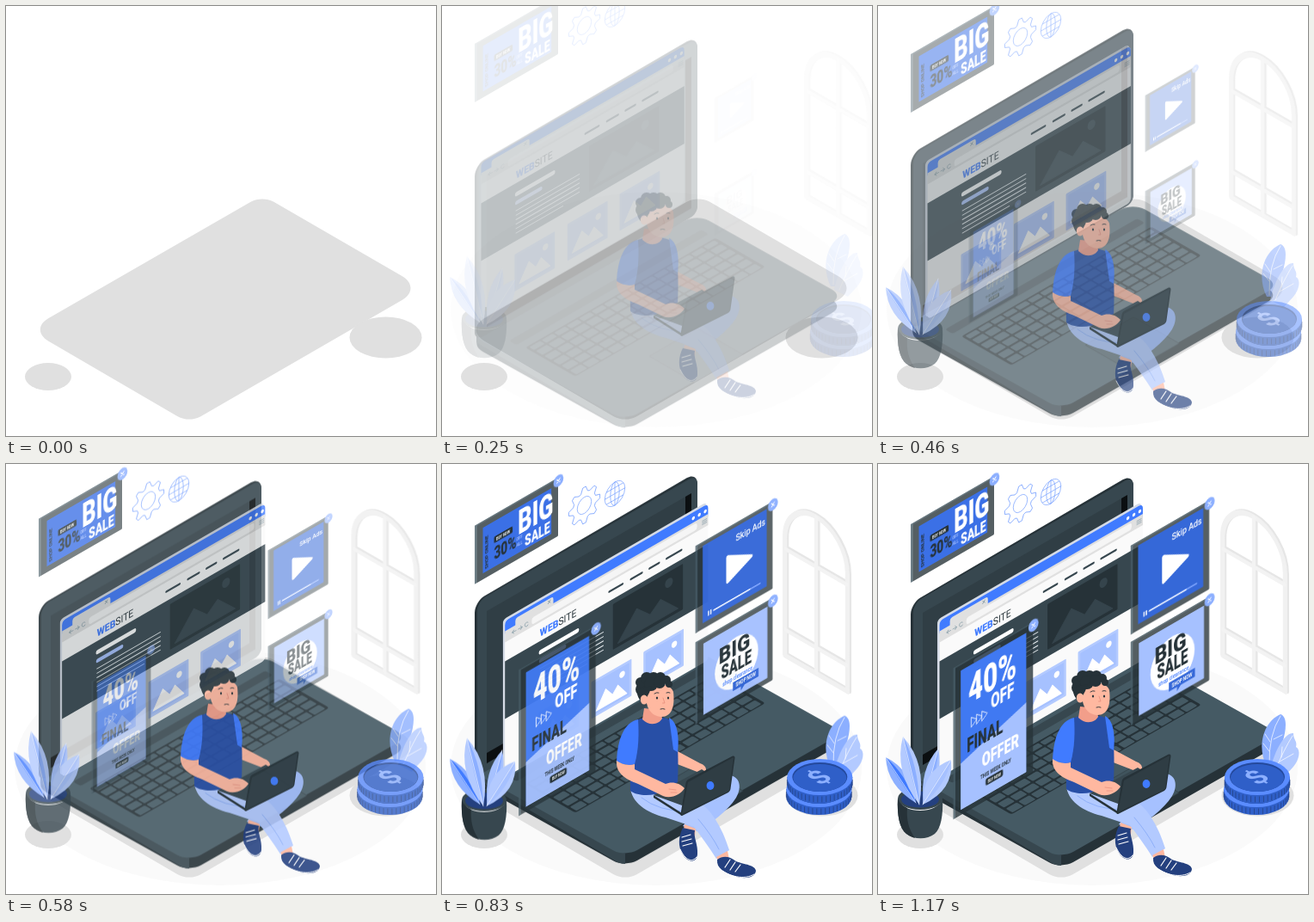
An HTML page that plays this animation: 500x500 px, repeating every 1210 ms.

```html
<!DOCTYPE html>
<html lang="en">
<head>
<meta charset="utf-8">
<title>Online ads</title>
<style>
  html, body { margin: 0; width: 100%; height: 100%; overflow: hidden; background: #fff; }
  svg { display: block; width: 100%; height: 100%; }
  text { font-family: Roboto, "Liberation Sans", sans-serif; }
</style>
</head>
<body>
<svg id="stage" viewBox="0 0 500 500"></svg>
<script>
const BLUE = '#407bff', PALE = '#a6c1ff', LIGHT = '#b3caff', INK = '#263238', SLATE = '#37474f', STEEL = '#455a64',
  NAVY = '#24407f', SKIN = '#ffb8a0', BLUSH = '#e58d7b';

// Markup helpers
const path = (d, fill, more = '') => `<path d="${d}" fill="${fill}" ${more}/>`;
const stroke = (d, color, w = 1, more = '') =>
  `<path d="${d}" fill="none" stroke="${color}" stroke-width="${w}" stroke-linecap="round" stroke-linejoin="round" ${more}/>`;
const rect = (x, y, w, h, fill, r = 0) => `<rect x="${x}" y="${y}" width="${w}" height="${h}" rx="${r}" fill="${fill}"/>`;
const oval = (x, y, rx, ry, fill, more = '') => `<ellipse cx="${x}" cy="${y}" rx="${rx}" ry="${ry}" fill="${fill}" ${more}/>`;
const dot = (x, y, r, fill, more) => oval(x, y, r, r, fill, more);
const text = (x, y, size, fill, str, weight = 700) =>
  `<text x="${x}" y="${y}" font-size="${size}" font-weight="${weight}" fill="${fill}">${str}</text>`;
const narrow = (x, y, size, fill, str, weight = 700) =>
  `<g transform="translate(${x} ${y}) scale(.75 1)">${text(0, 0, size, fill, str, weight)}</g>`;
const plane = (m, x, y, inner) => `<g transform="matrix(${m} ${x} ${y})">${inner}</g>`;
const wall = (x, y, inner) => plane('.866 -.5 0 1', x, y, inner);
const sideWall = (x, y, inner) => plane('.866 .5 0 1', x, y, inner);
const floor = (x, y, inner) => plane('.866 -.5 .866 .5', x, y, inner);
const times = (n, f) => Array.from({ length: n }, (_, i) => f(i)).join('');

// Polygon with rounded corners; each point is [x, y, cut length]
function blob(pts, fill) {
  const n = pts.length, k = .45;
  const d = pts.map(([x, y, c], i) => {
    const toward = ([px, py], len) => {
      const l = Math.hypot(px - x, py - y);
      return [x + (px - x) * len / l, y + (py - y) * len / l];
    };
    const a = pts[(i + n - 1) % n], b = pts[(i + 1) % n];
    return `${i ? 'L' : 'M'}${toward(a, c)}C${toward(a, c * k)} ${toward(b, c * k)} ${toward(b, c)}`;
  }).join('');
  return path(d + 'Z', fill);
}

function shadows() {
  return blob([[26.6, 376.3, 26], [298, 220, 15], [484.7, 328, 28], [213, 485, 15]], '#e0e0e0') +
    oval(49, 431, 27, 16, '#e0e0e0') + oval(441.5, 385.5, 42, 24, '#e0e0e0');
}

function archWindow() {
  const arch = 'M3 -3V-140A42 45 0 0 1 87 -140V-3Z';
  const bars = 'M45 -4V-184M4 -127H86M4 -33H86';
  return sideWall(400, 223, stroke(arch + bars, '#e6e6e6', 6)) +
    sideWall(398, 224, stroke(arch, '#f1f1f1', 6) + stroke(bars, '#f3f3f3', 5));
}

function gearAndGlobe() {
  const p = times(32, i => {
    const a = (i - .5) * Math.PI / 16, r = i % 4 < 2 ? 21 : 15.5;
    return `${i ? 'L' : 'M'}${(r * Math.cos(a)).toFixed(1)} ${(r * Math.sin(a)).toFixed(1)}`;
  });
  const ring = `fill="none" stroke="${BLUE}" stroke-width=".7"`;
  return `<g opacity=".7">` +
    wall(165.5, 46, stroke(p + 'Z', BLUE, .8) + `<circle r="9.5" ${ring}/>`) +
    wall(201, 32.5, `<circle r="13.5" ${ring}/><ellipse rx="6" ry="13.5" ${ring}/>` +
      stroke('M0 -13.5V13.5M-13.5 0H13.5M-11 -7H11M-11 7H11', BLUE, .7)) + '</g>';
}

function laptop() {
  const board = [[30, 357, 20], [297, 219, 15], [467, 314, 15], [213, 459, 16]];
  const low = board.map(([x, y, c]) => [x, y + 12, c]);
  const keys = times(6, r => times(15, c => {
    if (r === 5 && c > 4 && c < 9) return c === 5 ? rect(86, 57, 64, 8.5, STEEL, 1.5) : '';
    return rect(3 + c * 16.7, r ? 11 + (r - 1) * 11.4 : 2, 14.6, r ? 9 : 6.5, STEEL, 1.5);
  }));
  return blob(low, INK) +
    path('M40 356V368L199 462Q206 467 213 467V455Z', SLATE) + blob(board, STEEL) +
    floor(78, 366, rect(0, 0, 258, 10, SLATE, 3)) +
    floor(97, 374, rect(0, 0, 255, 67, INK, 3) + keys) +
    floor(240, 384, rect(0, 0, 66, 62, SLATE, 2) + rect(1, 1, 64, 60, '#40545d', 2)) +
    blob([[38, 162, 13], [297, 11, 14], [297, 218, 10], [38, 366, 10]], INK) +
    blob([[41, 162, 11], [297, 14, 11], [297, 218, 8], [41, 365, 8]], SLATE) +
    path('M52 173L290 36V212L52 350Z', '#303e45') +
    path('M52 350L290 212V36L283 40V205L52 338Z', '#0b0f11');
}

function picture(x, y, w, h, back, front) {
  const at = (u, v) => `${x + u * w} ${y + v * h}`;
  return rect(x, y, w, h, back, 1) + dot(x + w * .8, y + h * .24, h * .1, front) +
    path(`M${at(.07, .92)}L${at(.34, .4)}L${at(.53, .7)}L${at(.68, .5)}L${at(.93, .92)}Z`, front, `stroke="${front}" stroke-linejoin="round"`);
}

function browser() {
  const cards = [45, 116, 186].map(x => rect(x, 129, 54, 43, LIGHT, 1) +
    picture(x + 3, 132, 48, 37, PALE, '#fff')).join('');
  return wall(69, 181, rect(0, 0, 274, 182, '#d5dbe6', 5)) + wall(71.5, 182.5,
    rect(0, 0, 273, 182, '#fafafa', 5) + rect(0, 0, 273, 18, BLUE, 5) +
    rect(0, 12, 273, 13, '#e0e0e0') + rect(14, 4, 51, 11, '#e0e0e0', 3) +
    stroke('M58 6l3 3m0 -3l-3 3', '#78909c', .7) +
    stroke('M10 18.5h5m-5 0l2 -2m-2 2l2 2M23 18.5h-5m5 0l-2 -2m2 2l-2 2M31 17a2.4 2.4 0 1 0 0 3M265 16.5h6m-6 2h6m-6 2h6', '#90a4ae', .8) +
    rect(36, 14.5, 222, 8, '#f5f5f5', 3) + [253, 261, 269].map(x => dot(x, 7, 2, '#fff')).join('') +
    `<text x="47" y="42" font-size="12"><tspan font-weight="800" fill="${BLUE}">WEB</tspan><tspan fill="${INK}">SITE</tspan></text>` +
    stroke('M140 36h18M169 36h15M194 36h13M217 36h20', SLATE, 2.4) +
    rect(0, 47, 273, 67, SLATE) + picture(145, 53, 94, 53, INK, '#35444c') +
    stroke('M48 60H97', '#fff', 5) + stroke('M48 70H80', PALE, 4.5) +
    times(6, i => stroke(`M47 ${79 + i * 5.2}H${i === 5 ? 110 : 132}`, '#e8edf0', 1.1)) + cards);
}

const closer = (x, y) => dot(x, y, 6.8, '#8cafff') + stroke(`M${x - 2} ${y - 2}l4 4m0 -4l-4 4`, '#fff', 1.1);

// Dark translucent pane with its thin left side and a close button
function pane(x, y, w, h, inner) {
  return wall(x, y, `<g opacity=".78">${rect(0, 0, w, h, INK, 1) + rect(0, 0, 3, h, STEEL) + rect(0, 0, w, 1.5, STEEL)}</g>` +
    inner + closer(w + .5, 4));
}

function adBoard() {
  return pane(38, 70, 112, 68, rect(11, 8, 92, 53, '#3b70e6') +
    `<g transform="translate(18 58) rotate(-90)">${text(0, 0, 6, INK, 'SHOP ONLINE')}</g>` +
    rect(26, 26, 25, 7.5, INK, 1.5) + narrow(29, 32, 5.5, '#fff', 'BUY NOW') +
    narrow(26, 53, 21, INK, '30%', 800) + narrow(56, 46, 6, PALE, 'OFF') + narrow(56, 53, 6, PALE, 'ALL') +
    narrow(58, 40, 39, '#fff', 'BIG', 900) + narrow(67, 58, 19, '#fff', 'SALE', 800));
}

function offerPane() {
  return pane(88, 238, 106, 174, rect(10, 8, 87, 160, '#4079f2') +
    path('M10 115L97 88V168H10Z', PALE) + narrow(20, 51, 45, '#fff', '40%', 800) +
    narrow(50, 72, 23, '#fff', 'OFF', 800) +
    stroke('M24 69v11l7 -5.5zM31 69v11l7 -5.5zM38 69v11l7 -5.5z', '#fff', .9) +
    narrow(18, 107, 23, INK, 'FINAL', 800) + narrow(38, 133, 22, '#fff', 'OFFER', 800) +
    narrow(36, 146, 7, INK, 'THIS WEEK ONLY') + rect(43, 149, 23, 8, INK, 2) + narrow(46, 155, 5.2, '#fff', 'BUY NOW'));
}

function videoPane() {
  return pane(294, 95, 105, 103, rect(10, 5, 87, 91, '#3568d8') + text(55, 22, 10.2, '#fff', 'Skip Ads', 500) +
    path('M44 35L76 50L44 64Z', '#fff', 'stroke="#fff" stroke-width="4" stroke-linejoin="round"') +
    stroke('M25 88H88', '#7fa5ff', 1.8) + stroke('M25 88H74M18 86v4.5M21 86v4.5', '#fff', 1.6));
}

function salePane() {
  return pane(294, 207, 105, 97, rect(11, 7, 87, 84, PALE) + dot(56, 51, 29.5, '#fff') +
    text(32, 43, 26, INK, 'BIG', 900) + narrow(35, 62, 23, INK, 'SALE', 900) +
    narrow(37, 70.5, 8, BLUE, 'shop clearance', 500) +
    path('M51 73H86V83H67L62 88V83H51Z', '#3568d8') + narrow(55, 80.5, 7, '#fff', 'SHOP NOW'));
}

// Leaf from its foot to its tip, one half darker
function leaf(x, y, tx, ty, w, light, dark) {
  const l = Math.hypot(tx - x, ty - y), nx = (y - ty) / l * w, ny = (tx - x) / l * w;
  const mx = x + (tx - x) * .55, my = y + (ty - y) * .55;
  const foot = `${x} ${y}`, tip = `${tx} ${ty}`;
  const side = s => `${mx + nx * s} ${my + ny * s}`;
  return path(`M${foot}Q${side(1)} ${tip}Q${side(-1)} ${foot}Z`, light) +
    path(`M${foot}Q${side(.5)} ${tip}Q${side(-.1)} ${foot}Z`, dark) + stroke(`M${foot}L${tip}`, '#fff', .6);
}

function plant() {
  return oval(49, 389, 26, 13, SLATE) + oval(49, 390, 22, 9.5, NAVY) +
    leaf(44, 394, 9, 341, 17, '#8cafff', BLUE) + leaf(53, 394, 70, 331, 15, PALE, '#8cafff') +
    leaf(48, 396, 29, 317, 20, LIGHT, '#8cafff') + leaf(52, 396, 85, 344, 22, LIGHT, PALE) +
    path('M23 389C22 408 25 424 33 430C42 437 57 437 66 430C73 424 76 408 75 389C72 399 60 403 49 403C38 403 26 399 23 389Z', SLATE) +
    path('M23 389C22 408 25 424 33 430C37 433 40 434 43 435C35 424 33 412 34 400Q26 397 23 389Z', INK);
}

function coinLeaves() {
  return path('M452 352C440 328 448 300 468 291C478 294 476 318 458 352Z', '#8cafff') +
    stroke('M455 350Q454 315 468 293M455 334l-7 -9M456 323l-6 -9M460 320l10 -5', '#fff', .7) +
    path('M456 356C462 330 474 312 483 313C483 321 488 322 486 329C492 332 490 344 483 352L472 364Z', LIGHT) +
    stroke('M462 356Q472 332 482 316M469 341l1 -12M467 346l16 -9', '#fff', .7);
}

function coin(x, y) {
  return path(`M${x - 38} ${y}V${y + 9}A38 21 0 0 0 ${x + 38} ${y + 9}V${y}Z`, '#2f5fc8') +
    times(24, i => {
      const a = (i + .5) * Math.PI / 24, ex = x + 38 * Math.cos(a), ey = y + 21 * Math.sin(a);
      return stroke(`M${ex} ${ey + 2}v6`, NAVY, .7);
    }) + oval(x, y, 38, 21, '#5a8cff') + oval(x, y, 32, 17, '#24499c') + oval(x, y + 1, 31, 16, '#2f5fc8');
}

function coins() {
  return coin(440, 378) + coin(441, 364) + floor(440, 364, text(-9, 11, 31, '#8cafff', '$'));
}

function person() {
  const curls = [[232, 260, 7], [231, 252, 6], [238, 247, 7], [246, 247, 7], [254, 246, 6], [261, 249, 5], [264, 254, 4], [243, 254, 8], [253, 252, 7]];
  return path('M250 386L326 361C344 356 351 371 342 386C332 402 312 416 297 425L280 419L296 398Z', PALE) +
    path('M282 417L295 422L294 431L280 428Z', SKIN) +
    path('M280 421C275 431 274 443 280 452C286 462 296 462 297 452C298 440 292 432 294 424Z', NAVY) +
    stroke('M279 432l10 -3M279 437l11 -3M280 442l11 -3', '#fff', 1.2) +
    stroke('M277 446C283 459 291 462 296 455', '#fff', 1) +
    path('M219 374C220 391 238 404 260 409L293 420C302 432 311 444 319 457L334 447C327 424 315 402 300 392L262 372Z', LIGHT) +
    stroke('M232 386Q252 402 286 402M298 411Q314 430 322 446', '#7ea4f5', .7) +
    path('M319 455L332 448L334 458L322 461Z', SKIN) +
    path('M320 458C327 453 334 454 342 460C352 464 364 464 365 471C364 480 350 481 340 477C328 473 319 468 320 458Z', NAVY) +
    stroke('M329 467l6 -9M335 470l6 -9M341 472l6 -8', '#fff', 1.2) +
    stroke('M322 468C333 478 352 482 363 475', '#fff', 1) +
    path('M272 331L300 346C309 349 309 357 302 358L271 346Z', SKIN) +
    path('M228 295C220 304 218 330 219 378C232 388 262 382 274 370C275 345 275 316 270 299C264 291 240 290 228 295Z', '#284fa6') +
    path('M264 293C274 298 276 316 274 333L269 330Z', BLUE) +
    path('M228 295C212 298 204 318 203 344Q214 350 224 347C229 330 229 310 228 295Z', BLUE) +
    path('M235 282L233 295C241 303 252 301 256 294L254 284Z', '#f29e8a') +
    path('M237 262C236 282 243 291 255 292C267 292 271 280 269 263C265 252 242 250 237 262Z', SKIN) +
    curls.map(([x, y, r]) => dot(x, y, r, INK)).join('') +
    path('M226 260C227 270 231 275 235 275L241 264L244 256Z', INK) + oval(235, 272, 4.2, 5.5, SKIN) +
    oval(250, 270, 1.1, 1.6, INK) + oval(263, 270, 1.1, 1.6, INK) +
    stroke('M247 265q3 -2 5 -1M261 264q2 -1 4 0M254 283q3 -1 5 0', INK, .9) +
    stroke('M257 270l2 6h-2.5', BLUSH, .8) +
    path('M246 383L302 353L322 366L279 395Z', SLATE) + path('M246 383L279 404V407L246 386Z', INK) +
    path('M203 343C202 357 212 364 228 370L257 384C266 388 278 382 282 375C276 368 266 367 260 370L224 353V347Q213 350 203 343Z', SKIN) +
    stroke('M264 376l8 1M266 380l7 0', BLUSH, .7) +
    blob([[284, 366, 3], [341, 336, 4], [335, 379, 3], [277, 408, 3]], INK) +
    path('M286 368L339 339L334 378L279 405Z', '#2f3d44') + oval(312, 372, 4.4, 5, BLUE);
}

// Entrances: [markup, start keyframe, delay in ms, zoom origin]
const fade = 'none', up = 'translate(0,30px)', down = 'translate(0,-30px)',
  left = 'translate(30px,0)', right = 'translate(-30px,0)', zoom = 'scale(.5)';
const layers = [
  [oval(249, 353, 239, 137, '#fafafa'), fade, 0],
  [archWindow(), left, 0],
  [shadows()],
  [gearAndGlobe(), down, 0],
  [laptop(), up, 0],
  [browser(), right, 60],
  [adBoard(), down, 60],
  [offerPane(), zoom, 200, '134px 298px'],
  [plant(), down, 60],
  [videoPane(), zoom, 180, '340px 120px'],
  [salePane(), zoom, 180, '340px 230px'],
  [person(), down, 0],
  [coinLeaves(), down, 60],
  [coins(), left, 60],
];

const stage = document.getElementById('stage');
stage.innerHTML = layers.map(([markup]) => `<g>${markup}</g>`).join('');

const moves = [];
layers.forEach(([, from, delay, origin], i) => {
  if (!from) return;
  const node = stage.children[i];
  if (origin) node.style.transformOrigin = origin;
  const rest = from === zoom ? 'scale(1)' : from === fade ? 'none' : 'translate(0,0)';
  const move = node.animate(
    [{ opacity: 0, transform: from }, { opacity: 1, transform: rest }],
    { duration: 1000, delay, fill: 'both', easing: 'cubic-bezier(.36,-.01,.5,1.38)' });
  move.pause();
  moves.push(move);
});

// 24 pictures a second; the first three show the bare shadows
const LOOP = 1210, STEP = 1000 / 24;
const start = performance.now();
function draw(now) {
  const step = Math.floor(((Math.max(0, now - start) % LOOP) + 5) / STEP);
  const time = step < 3 ? 0 : step * STEP;
  for (const move of moves) move.currentTime = time;
  requestAnimationFrame(draw);
}
draw(start);
</script>
</body>
</html>
```
